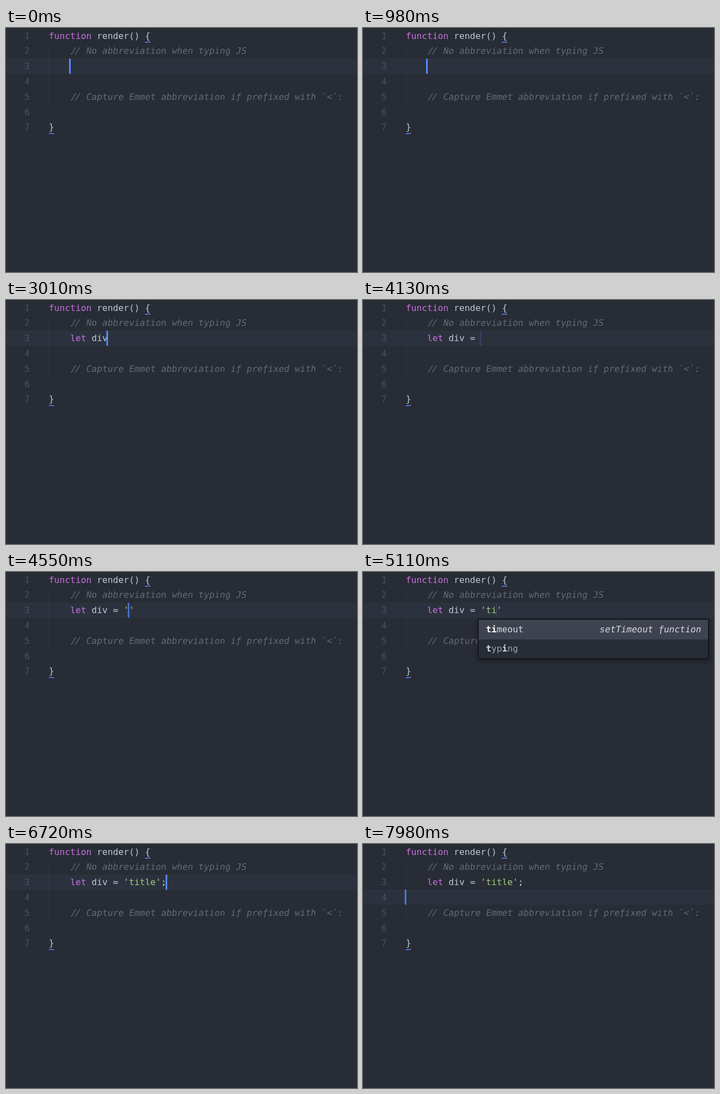
An HTML page with a canvas for the animation above (8 s loop, 640 by 445 pixels).

```html
<!DOCTYPE html>
<html lang="en">
<head>
<meta charset="utf-8">
<title>Editor typing</title>
<style>
html, body { margin: 0; width: 100%; height: 100%; overflow: hidden; background: #282c35; }
canvas { display: block; }
</style>
</head>
<body>
<canvas id="stage" width="640" height="445"></canvas>
<script>
const ctx = document.getElementById('stage').getContext('2d');
const LOOP = 8000, CELL = 9.75, ROW = 27.8, LEFT = 78, SLANT = 0.16;
const FONT = '16.2px "DejaVu Sans Mono", "Noto Sans Mono", monospace';
const C = {
  bg: '#282c35', active: '#2c323d', number: '#495060', text: '#c2c7d2',
  keyword: '#c670df', string: '#9fcc7e', comment: '#646a77',
  blue: '#528bff', guide: '#3d424d', border: '#15171c', selected: '#3f434f'
};

// Time of each keystroke in "let div = 'title';"
const CODE = "let div = 'title';";
const KEYS = [1650, 1850, 2120, 2330, 2550, 2720, 2900, 3180, 3500, 3800,
              4320, 4560, 4770, 5300, 5880, 6080, 6320, 6600];
const OPEN = CODE.indexOf("'"), CLOSE = CODE.lastIndexOf("'");
const DOWN = 7780;

const colX = col => LEFT + col * CELL;
const baseline = row => 19.5 + row * ROW;

function rect(x, y, w, h, color) {
  ctx.fillStyle = color;
  ctx.fillRect(x, y, w, h);
}

function text(str, x, y, color, weight = 400) {
  ctx.font = weight + ' ' + FONT;
  ctx.fillStyle = color;
  [...str].forEach((ch, i) => ctx.fillText(ch, x + i * CELL, y));
}

function slanted(str, x, y, color) {
  [...str].forEach((ch, i) => {
    // The two slashes of a comment sit close together.
    let dx = -0.8;
    if (ch === '/') dx += i === 0 ? 1.2 : -1.2;
    ctx.save();
    ctx.translate(x + i * CELL + dx, y);
    ctx.transform(1, 0, -SLANT, 1, 0, 0);
    text(ch, 0, 0, color);
    if (ch === 'f') rect(4, 0, 1.5, 3, color);
    ctx.restore();
  });
}

function drawTyped(count) {
  const y = baseline(2);
  const x = col => colX(4 + col);
  const typed = CODE.slice(0, count);
  text(typed.slice(0, 3), x(0), y, count >= 3 ? C.keyword : C.text);
  text(typed.slice(3, OPEN), x(3), y, C.text);
  let str = typed.slice(OPEN, CLOSE + 1);
  if (count > OPEN && count <= CLOSE) str += "'";
  text(str, x(OPEN), y, C.string);
  text(typed.slice(CLOSE + 1), x(CLOSE + 1), y, C.text);
}

function drawMatch(word, marks, y, color, strong) {
  [...word].forEach((ch, i) => {
    const hit = marks.includes(i);
    text(ch, 224.3 + i * CELL, y, hit ? strong : color, hit ? 700 : 400);
  });
}

function drawPopup(both) {
  const bottom = both ? 159 : 125;
  ctx.save();
  ctx.shadowColor = 'rgba(0,0,0,.35)';
  ctx.shadowBlur = 8;
  ctx.shadowOffsetY = 4;
  rect(209, 85, 422, bottom - 85, C.border);
  ctx.restore();
  rect(211, 87, 418, bottom - 89, C.bg);
  rect(211, 87, 418, 36, C.selected);
  drawMatch('timeout', both ? [0, 1] : [0, 1, 6], 109.8, '#d6d9e1', '#ffffff');
  slanted('setTimeout function', 431.5, 109.8, '#d6d9e1');
  if (both) drawMatch('typing', [0, 3], 144.8, '#9ca1ad', '#d6d9e1');
}

function drawCaret(t, count) {
  const moved = t >= DOWN;
  const last = moved ? DOWN : count ? KEYS[count - 1] : 0;
  const wave = 0.5 + 0.9 * Math.cos((t - last) / 1060 * 2 * Math.PI);
  ctx.globalAlpha = Math.max(0, Math.min(1, wave));
  const x = moved ? colX(0) : colX(4 + count);
  rect(Math.floor(x - 1.5), Math.round((moved ? 3 : 2) * ROW), 3, 27.5, C.blue);
  ctx.globalAlpha = 1;
}

function draw(t) {
  const count = KEYS.filter(k => k <= t).length;
  rect(0, 0, 640, 445, C.bg);
  rect(0, Math.round((t >= DOWN ? 3 : 2) * ROW), 640, 27.5, C.active);

  for (let y = 31; y < 138; y += 2) rect(78, y, 1, 1, C.guide);
  for (let i = 0; i < 7; i++) text(String(i + 1), 33.6, baseline(i), C.number);

  text('function', colX(0), baseline(0), C.keyword);
  text('render() {', colX(9), baseline(0), C.text);
  slanted('// No abbreviation when typing JS', colX(4), baseline(1), C.comment);
  drawTyped(count);
  slanted('// Capture Emmet abbreviation if prefixed with `<`:', colX(4), baseline(4), C.comment);
  text('}', colX(0), baseline(6), C.text);
  rect(colX(18), 25, CELL, 1.5, C.blue);
  rect(colX(0), 191.7, CELL, 1.5, C.blue);

  drawCaret(t, count);
  if (count === 13 || count === 14) drawPopup(count === 13);
}

const start = performance.now();
function tick() {
  draw((performance.now() - start) % LOOP);
  requestAnimationFrame(tick);
}
tick();
</script>
</body>
</html>
```
